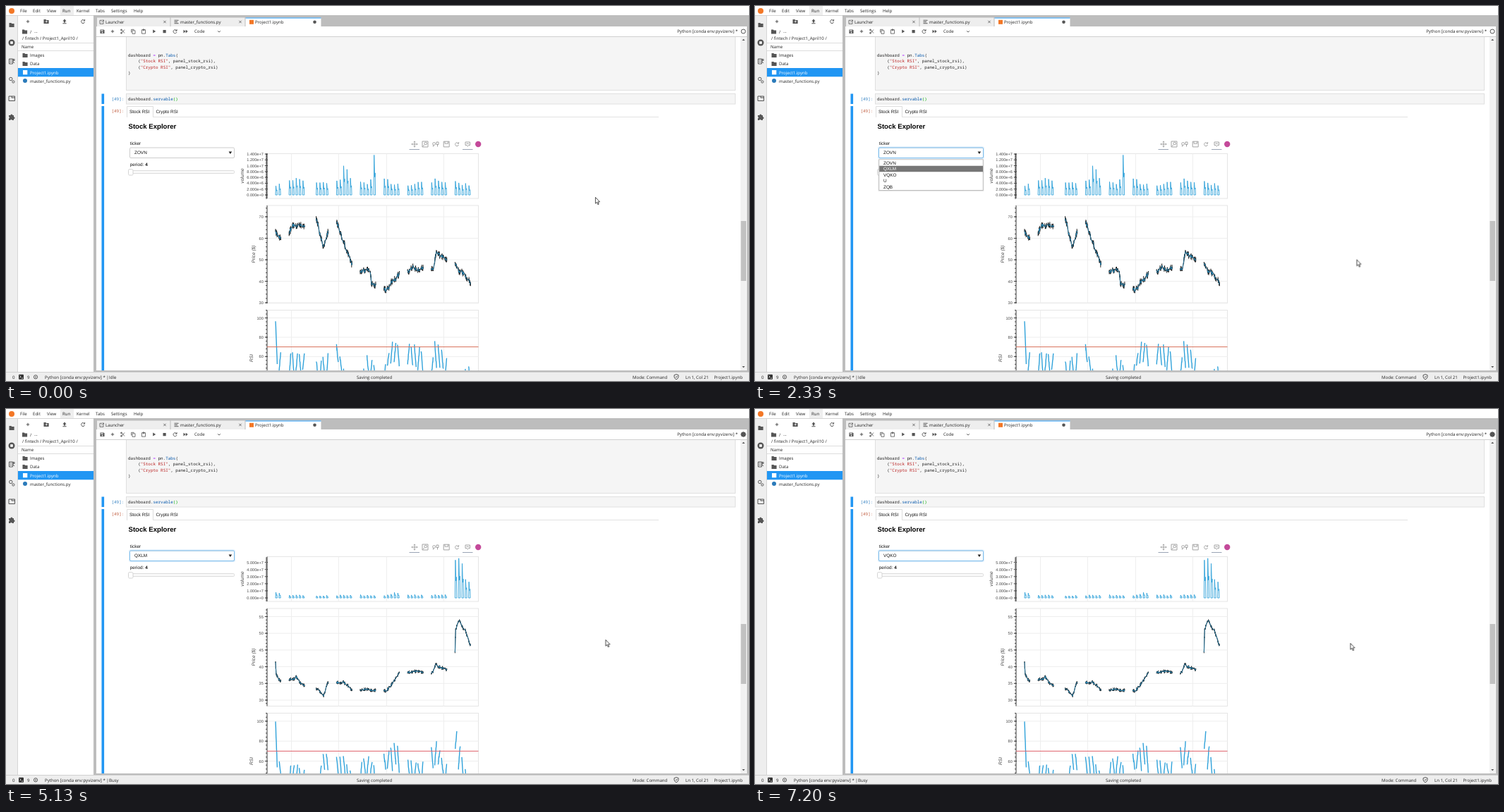
An HTML page that plays this animation: 1053x532 px, repeating every 8000 ms.

```html
<!DOCTYPE html>
<html lang="en">
<head>
<meta charset="utf-8">
<title>Notebook dashboard</title>
<style>
html, body { margin: 0; width: 100%; height: 100%; overflow: hidden; background: #fff; }
svg { display: block; width: 1053px; height: 532px; }
text { font: 6.1px "Open Sans", sans-serif; fill: #222; white-space: pre; text-rendering: geometricPrecision; }
.p { font: 6.4px "Liberation Sans", Arial, sans-serif; fill: #111; }
.h { font: bold 9.6px "Liberation Sans", Arial, sans-serif; fill: #000; }
.a { font: 5.6px "Liberation Sans", Arial, sans-serif; fill: #444; text-anchor: end; }
.n { font: italic 6.6px "Liberation Sans", Arial, sans-serif; fill: #444; text-anchor: middle; }
.m { font: 5.92px "Noto Sans Mono", monospace; fill: #222; }
.w { fill: #fff; }
.e { text-anchor: end; }
.i { fill: none; stroke: #555; stroke-width: 1; }
.f { fill: #555; }
.g { fill: none; stroke: #a3a3a3; stroke-width: 1; }
.thin { fill: none; stroke: #555; stroke-width: .8; }

.anim { animation: 8s step-end infinite; opacity: 0; }
#menu { animation-name: menu; }
#row { animation: row 8s step-end infinite; }
#ring { animation-name: ring; }
#busy { animation-name: busy; }
#idle { animation-name: idle; }
#chartA { animation-name: before; }
#chartB { animation-name: after; }
#pick0 { animation-name: pick0; }
#pick1 { animation-name: pick1; }
#pick2 { animation-name: pick2; }
#cursor { animation: move 8s step-end infinite; }

@keyframes menu {
  0%, 34.95%, 80.8%, 100% { opacity: 0 }
  25.8%, 69.1% { opacity: 1 }
}
@keyframes row {
  0% { transform: translateY(0) }
  27.45% { transform: translateY(8.5px) }
  77.45%, 100% { transform: translateY(17px) }
}
@keyframes ring { 0% { opacity: 0 } 25.8%, 100% { opacity: 1 } }
@keyframes busy {
  0%, 64.95% { opacity: 0 }
  35.8%, 81.7%, 100% { opacity: 1 }
}
@keyframes idle {
  0%, 64.95% { opacity: 1 }
  35.8%, 81.7%, 100% { opacity: 0 }
}
@keyframes before { 0% { opacity: 1 } 64.1%, 100% { opacity: 0 } }
@keyframes after { 0% { opacity: 0 } 64.1%, 100% { opacity: 1 } }
@keyframes pick0 { 0% { opacity: 1 } 34.95%, 100% { opacity: 0 } }
@keyframes pick1 { 0%, 80.8%, 100% { opacity: 0 } 34.95% { opacity: 1 } }
@keyframes pick2 { 0% { opacity: 0 } 80.8%, 100% { opacity: 1 } }
@keyframes move {
  0% { transform: translate(835px, 271px) }
  1.6% { transform: translate(835px, 271px); animation-timing-function: steps(4, start) }
  4.95% { transform: translate(835px, 302px) }
  5.85% { transform: translate(835px, 299px) }
  14.95% { transform: translate(835px, 299px); animation-timing-function: steps(4, start) }
  18.3% { transform: translate(854px, 311px) }
  20.8% { transform: translate(854px, 311px); animation-timing-function: steps(3, start) }
  23.3% { transform: translate(854px, 331.5px) }
  25.8% { transform: translate(854px, 331.5px); animation-timing-function: steps(5, start) }
  29.95% { transform: translate(852.5px, 359.5px) }
  30.8% { transform: translate(852.5px, 361px) }
  34.95% { transform: translate(852.5px, 361px); animation-timing-function: steps(8, start) }
  41.6% { transform: translate(849.5px, 325.5px) }
  46.6% { transform: translate(849.5px, 327px) }
  69.1% { transform: translate(849.5px, 327px); animation-timing-function: steps(5, start) }
  73.3% { transform: translate(847.5px, 354.5px); animation-timing-function: steps(2, start) }
  74.95% { transform: translate(846px, 370px) }
  77.45% { transform: translate(845.5px, 373px) }
  78.3% { transform: translate(845px, 376px) }
  80.8% { transform: translate(845px, 376px); animation-timing-function: steps(6, start) }
  85.8% { transform: translate(843.5px, 333px) }
  89.95%, 100% { transform: translate(843.5px, 332px) }
}
</style>
</head>
<body>
<svg id="stage" viewBox="0 0 1053 532" xmlns="http://www.w3.org/2000/svg"></svg>
<script>
const BLUE = '#30a2da';
const text = (x, y, s, cls = '', more = '') => `<text x="${x}" y="${y}" class="${cls}" ${more}>${s}</text>`;
const rect = (x, y, w, h, fill, more = '') => `<rect x="${x}" y="${y}" width="${w}" height="${h}" fill="${fill}" ${more}/>`;
const path = (d, cls = 'i', more = '') => `<path d="${d}" class="${cls}" ${more}/>`;
const line = (d, color, width = 1) => `<path d="${d}" fill="none" stroke="${color}" stroke-width="${width}"/>`;
const disc = (x, y, r, fill) => `<circle cx="${x}" cy="${y}" r="${r}" fill="${fill}"/>`;
const ink = (color, s) => `<tspan fill="${color}">${s}</tspan>`;
const group = (id, s) => `<g id="${id}" class="anim">${s}</g>`;
const folder = (x, y) => path('M-3.5-3h2.8l1 1h3.3v5h-7.1z', 'f', `transform="translate(${x} ${y})"`);
const plus = (x, y) => path(`M${x - 2.2} ${y}h4.4M${x} ${y - 2.2}v4.4`);
const reload = (x, y, cls = 'i') => path(`M${x + 2.2} ${y - 1.3}a2.5 2.5 0 1 0 .3 2M${x + 2.6} ${y - 3}v2h-2`, cls);
const cross = (x, y) => path(`M${x - 1.7} ${y - 1.7}l3.4 3.4m0-3.4l-3.4 3.4`, 'thin');

function rng(seed) {
  return () => (seed = (seed * 16807) % 2147483647) / 2147483647;
}

// Height at x on the polyline through the given points.
function curve(points, x) {
  const i = points.findIndex(p => p[0] >= x);
  if (i < 1) return points.at(i)[1];
  const [[x0, y0], [x1, y1]] = [points[i - 1], points[i]];
  return y0 + (y1 - y0) * (x - x0) / (x1 - x0);
}

// Trading days: five per week, short first and third weeks.
const weeks = Array.from({ length: 9 }, (_, week) => {
  const skip = [3, 0, 1][week] || 0;
  return Array.from({ length: 5 - skip }, (_, d) => 367.6 + 33.6 * week + 4.8 * (d + skip));
});
const days = weeks.flat();

function menuBar() {
  const items = [[20, 'File'], [38, 'Edit'], [58, 'View'], [80, 'Run'], [100, 'Kernel'], [127, 'Tabs'], [149, 'Settings'], [181, 'Help']];
  return rect(0, 0, 1053, 13, '#fff') + rect(77, 0, 19, 13, '#eee') + disc(8, 7, 4, '#f37726')
    + items.map(([x, s]) => text(x, 9.2, s)).join('');
}

function sideBar() {
  let s = rect(0, 13, 16, 506, '#eee') + line('M0 13.5H124M16.5 13.5V519', '#d5d5d5');
  s += folder(8, 27);
  s += disc(8, 52, 4.5, '#555') + rect(6.2, 50.2, 3.6, 3.6, '#fff');
  s += path('M4.5 75h5v7h-5zM6 77h2M6 79.5h2M10 75.5h2v2h-2z M10 79l2 2');
  s += path('M9 103.5a2.2 2.2 0 1 1-4.4 0a2.2 2.2 0 1 1 4.4 0M12 107.5a1.6 1.6 0 1 1-3.2 0a1.6 1.6 0 1 1 3.2 0');
  s += path('M4 128h8.5v6.5H4zM8 128v2h4.5');
  s += path('M4 155h2.4a1.5 1.5 0 0 1 3 0H11v2.3a1.5 1.5 0 0 1 0 3V162H8.7a1.4 1.4 0 0 0-2.6 0H4v-2.4a1.4 1.4 0 0 0 0-2.6z', 'f');
  return s;
}

function fileList() {
  let s = rect(17, 14, 107, 505, '#fff');
  s += plus(31, 22) + folder(57, 22) + line('M57.3 20.6v3M55.8 22h3', '#fff', .8);
  s += path('M83 18.5l2.6 3h-1.5v2h-2.2v-2h-1.5zM80.4 24.2h5.2v1h-5.2z', 'f') + reload(109, 22);
  s += folder(26.5, 36.5) + text(34, 38.5, '/') + text(40, 37.5, '…');
  s += text(23, 47.5, '/ fintech / Project1_April10 /');
  s += line('M17 52.5H124M17 63.5H124', '#ddd') + text(22, 60.2, 'Name');
  s += rect(17, 88, 107, 12.3, '#2196f3');
  s += folder(27, 70) + folder(27, 82) + rect(24, 91, 6.3, 6.3, '#fff') + disc(27, 106, 3, '#2b7bba');
  ['Images', 'Data', 'Project1.ipynb', 'master_functions.py'].forEach((name, i) => {
    s += text(34, 72.2 + 12.15 * i, name, i === 2 ? 'w' : '');
  });
  return s;
}

function tabs() {
  let s = rect(124, 13, 929, 507, '#bdbdbd') + rect(128, 29, 922, 488, '#fff');
  s += rect(129, 16.5, 103.5, 12.5, '#eee') + rect(233.5, 16.5, 105, 12.5, '#eee');
  s += rect(339.5, 16.5, 107, 12.5, '#fff') + rect(339.5, 16.5, 107, 1, '#2196f3');
  s += path('M136 20.3h-3v5h5v-3M136.5 20h2v2M138.3 20.2l-3 3', 'thin') + text(141, 24.7, 'Launcher') + cross(225, 22.5);
  s += path('M238.5 20.3h6M238.5 22.5h4.5M238.5 24.7h6') + text(247, 24.7, 'master_functions.py') + cross(332, 22.5);
  s += rect(345, 19.8, 6, 6, '#f37726') + text(353, 24.7, 'Project1.ipynb') + disc(437.5, 22.7, 2.3, '#555');
  return s;
}

function toolbar() {
  let s = line('M128 43.5H1050', '#d0d0d0');
  s += path('M133.5 33.5h5l1 1v4.5h-6z', 'f') + rect(134.5, 34.3, 3, 1.2, '#fff') + disc(136.5, 37.5, .9, '#fff');
  s += plus(151, 36);
  s += path('M163 33l5 5.5M163 39l5-5.5M164.5 34a1 1 0 1 1-2 0a1 1 0 1 1 2 0M164.5 38.3a1 1 0 1 1-2 0a1 1 0 1 1 2 0', 'thin');
  s += path('M179 34.8h4v4.5h-4zM177.6 37.5v-4.2h4M192.5 33.7h5v5.5h-5zM194 33h2v1.5h-2z', 'thin');
  s += path('M208.2 33.6l4 2.5l-4 2.5zM222.5 34h4.2v4.2h-4.2z', 'f') + reload(239.5, 36.2);
  s += path('M251.5 33.8l3 2.3l-3 2.3zM254.7 33.8l3 2.3l-3 2.3z', 'f');
  s += text(267, 38.2, 'Code') + path('M300.3 35.3l1.8 1.8l1.8-1.8');
  s += text(1037, 38.3, 'Python [conda env:pyvizenv] *', 'e');
  s += '<circle cx="1045" cy="36" r="3" class="i"/>';
  return s + group('busy', disc(1045, 36, 3.5, '#555') + text(146, 528.5, 'Busy')) + group('idle', text(146, 528.5, 'Idle'));
}

function cells() {
  const edge = 'stroke="#e0e0e0"';
  const str = t => ink('#ba2121', `"${t}"`);
  let s = rect(170.5, 43.5, 863, 76, '#f5f5f5', edge) + rect(170.5, 124.5, 863, 14.5, '#f5f5f5', edge);
  s += rect(135.5, 124.5, 3.6, 14.5, '#2196f3') + rect(135.5, 142, 3.6, 375, '#2196f3');
  const code = [
    `dashboard ${ink('#a2f', '=')} pn.${ink('#05a', 'Tabs')}(`,
    `    (${str('Stock RSI')}, panel_stock_rsi),`,
    `    (${str('Crypto RSI')}, panel_crypto_rsi)`,
    ')'
  ];
  s += code.map((row, i) => text(173, 71.6 + 8.5 * i, row, 'm')).join('');
  s += text(173, 133.8, `dashboard.${ink('#05a', 'servable')}${ink('#0a0', '()')}`, 'm');
  s += text(149.5, 133.8, ink('#307fc1', '[49]:'), 'm') + text(149.5, 151, ink('#bf5b3d', '[49]:'), 'm');
  s += rect(1041, 44, 8.5, 473, '#f1f1f1') + rect(1041.5, 305, 7.5, 85, '#c1c1c1');
  return s + path('M1043.2 49l2-2.3l2 2.3zM1043.2 511l2 2.3l2-2.3z', 'f');
}

function panel() {
  let s = line('M171 157.5H925', '#e2e2e2') + line('M171.5 157V142.5H208.5V157', '#ddd') + line('M172 157.5H208', '#fff');
  s += text(175, 151.8, 'Stock RSI', 'p') + text(212.5, 151.8, 'Crypto RSI', 'p');
  s += text(173.5, 174, 'Stock Explorer', 'h') + text(175.8, 197.4, 'ticker', 'p');
  s += rect(175.5, 201, 148, 14.5, '#fff', 'stroke="#ccc" rx="1.5"');
  s += group('ring', rect(174.6, 200.1, 149.8, 16.3, 'none', 'stroke="#e0effb" rx="2.5" stroke-width="1.6"')
    + rect(175.5, 201, 148, 14.5, 'none', 'stroke="#7dbdec" rx="1.5"'));
  s += path('M315.6 206.6h4.6l-2.3 3.3z', 'f', 'style="fill:#222"');
  names.slice(0, 3).forEach((name, i) => { s += group('pick' + i, text(182, 210.3, name, 'p')); });
  s += text(175.8, 227.4, 'period: <tspan font-weight="bold">4</tspan>', 'p');
  s += rect(174, 233.5, 149.5, 4, '#fafafa', 'stroke="#d9d9d9" stroke-width=".9" rx="1"');
  s += rect(173.5, 231.7, 6.5, 8.3, '#fff', 'stroke="#d0d0d0" stroke-width=".9" rx="1.5"');
  return s + tools();
}

function tools() {
  let s = path('M579 192v8M575 196h8M577.8 193.2l1.2-1.4l1.2 1.4M577.8 198.8l1.2 1.4l1.2-1.4M576.2 194.8l-1.4 1.2l1.4 1.2M581.8 194.8l1.4 1.2l-1.4 1.2', 'g');
  s += path('M590 192h8v8h-8zM596.5 195a1.8 1.8 0 1 1-3.6 0a1.8 1.8 0 1 1 3.6 0M593.3 196.5l-3 3', 'g');
  s += path('M608.5 195.5a1.9 1.9 0 1 1-3.8 0a1.9 1.9 0 1 1 3.8 0M605.5 197v2.6M610 193h3v3.5h-3zM611.5 196.5v3', 'g');
  s += path('M620.2 192.2h8v7.7h-8zM622 192.2v3h4.5v-3', 'g') + reload(639, 196.2, 'g');
  s += path('M651 193h6.5v4.6h-2l-1.2 1.6l-1.2-1.6H651zM652.5 195.3h3.5', 'g');
  s += line('M571.5 203.5H586M647 203.5H661.5', '#9aa4b5');
  return s + disc(669.2, 196, 4.2, '#c44a9a');
}

function axis(top, bottom, y0, step, labels, ruled = true) {
  let grid = '', ticks = `M370 ${top}V${bottom}`, s = '';
  for (let y = y0 + 20 * step; y > top; y -= step / 5) if (y < bottom) ticks += `M368 ${y}h2`;
  labels.forEach((label, i) => {
    const y = y0 - i * step;
    grid += `M370 ${y}H669.5`;
    ticks += `M366.8 ${y}h4.2`;
    s += text(364.8, y + 2, label, 'a');
  });
  return (ruled ? line(grid, '#eee') : '') + line(ticks, '#333', .9) + s;
}

function frame(top, bottom) {
  return rect(370, top, 299.5, bottom - top, '#fff', 'stroke="#e5e5e5"')
    + line([404, 471, 539, 620].map(x => `M${x}.5 ${top}V${bottom}`).join(''), '#eee');
}

// One spike per day: busy open, quiet middle, small rise at the close.
function volume(keys, rand) {
  return line(days.map(x => {
    const h = curve(keys, x) * (.8 + .4 * rand());
    return `M${x} 268l.5 ${-h}l.9 ${h * .55}l.6 ${-h * .1}l.4 ${h * .55}z`;
  }).join(''), BLUE, .9);
}

// Seven hourly bars per day around the trend, with the close on top.
function price(keys, rough, rand) {
  let bars = '', close = '';
  for (const week of weeks) {
    const points = [];
    for (const x0 of week) {
      const shift = (rand() - .5) * rough;
      for (let x = x0; x < x0 + 2.8; x += .45) {
        const y = curve(keys, x) + shift + (rand() - .5) * rough;
        const reach = rough * (.2 + .35 * rand());
        bars += `M${x.toFixed(1)} ${(y - reach).toFixed(1)}v${(2 * reach).toFixed(1)}`;
        points.push(`${x.toFixed(1)} ${y.toFixed(1)}`);
      }
    }
    close += 'M' + points.join('L');
  }
  return line(close, '#111', 1.1) + line(bars, '#111', .9) + line(close, BLUE, .7);
}

// A jagged run per day that hangs from the key curve.
function strength(keys, rand) {
  return line(days.map((x, i) => {
    const top = curve(keys, x), length = i ? 18 + 18 * rand() : 62;
    const falling = !i || rand() < .6;
    const run = Array.from({ length: 8 }, (_, j) => {
      const t = falling ? j / 7 : 1 - j / 7;
      return `${(x + j * .35).toFixed(1)} ${(top + t * length + rand() * 5).toFixed(1)}`;
    });
    return 'M' + run.join('L');
  }).join(''), BLUE, 1.4);
}

function chart({ seed, volStep, volLabels, vol, scale, labels, trend, rough, rsi: [y60, step], peaks, limit }) {
  const rand = rng(seed);
  return frame(209.5, 273) + axis(209.5, 273, 268, volStep, volLabels, false) + volume(vol, rand)
    + frame(283, 421.5) + axis(283, 421.5, ...scale, labels) + price(trend, rough, rand)
    + frame(431.5, 540) + axis(431.5, 540, y60, step, [60, 80, 100]) + strength(peaks, rand)
    + line(`M370 ${y60 - step / 2}H669.5`, limit);
}

const range = (count, from, step) => Array.from({ length: count }, (_, i) => from + i * step);
const powers = (count, step) => range(count, 0, step).map(v => v.toExponential(3));

const first = {
  seed: 71, volStep: 8.29, volLabels: powers(8, 2e6), scale: [421, 30.5], labels: range(5, 30, 10),
  vol: [[382, 16], [416, 22], [473, 17], [478, 42], [490, 18], [516, 17], [521, 54], [535, 21], [569, 13], [608, 22], [656, 13]],
  trend: [[382, 318], [390, 332], [401, 324], [406, 313], [421, 313], [440, 306], [450, 341], [456, 319], [469, 309],
    [490, 369], [502, 375], [516, 375], [518, 398], [541, 403], [550, 388], [578, 372], [605, 373], [610, 346], [636, 368], [658, 393]],
  rough: 6, rsi: [497.3, 27.4], limit: '#d9705a',
  peaks: [[382, 443], [387, 490], [421, 490], [444, 502], [468, 478], [483, 528], [502, 525], [512, 494], [530, 520],
    [545, 476], [579, 480], [603, 498], [608, 472], [640, 525], [656, 508]]
};
const second = {
  seed: 137, volStep: 10.1, volLabels: powers(6, 1e7), scale: [413, 23.7], labels: range(6, 30, 5),
  vol: [[382, 10], [402, 3.5], [540, 4], [555, 8], [570, 4], [624, 4], [636, 50], [642, 54], [656, 19]],
  trend: [[382, 360], [383, 377], [389, 386], [411, 381], [423, 393], [440, 397], [450, 406], [456, 389], [478, 387],
    [490, 399], [540, 399], [557, 374], [604, 373], [609, 364], [624, 368], [636, 368], [637, 316], [642, 300], [650, 313], [658, 335]],
  rough: 3, rsi: [499.5, 28.3], limit: '#e0606a',
  peaks: [[382, 443], [387, 498], [411, 503], [440, 520], [449, 486], [478, 492], [488, 512], [512, 490], [521, 504],
    [550, 472], [569, 494], [588, 500], [608, 469], [621, 505], [636, 455], [645, 488], [656, 524]]
};

// Invented tickers.
const names = ['ZOVN', 'QXLM', 'VQKO', 'U', 'ZQB'];

function menu() {
  const rows = color => names.map((s, i) => text(182, 224.6 + 8.5 * i, s, 'p', `style="fill:${color}"`)).join('');
  return group('menu', rect(174.5, 217.5, 150, 45.5, '#000', 'opacity=".1" rx="1"')
    + rect(175.8, 217.8, 147.4, 43.6, '#fff', 'stroke="#b5b5b5" stroke-width=".8"') + rows('#111')
    + `<clipPath id="pickRow"><rect id="row" x="176.2" y="218.2" width="146.8" height="8.6"/></clipPath>
       <g clip-path="url(#pickRow)">${rect(176, 218, 147.2, 43.5, '#767676')}${rows('#fff')}</g>`);
}

function statusBar() {
  let s = rect(0, 519.5, 1053, 12.5, '#eee') + line('M0 519.5H1053', '#d0d0d0');
  s += text(9, 528.5, '0') + rect(18, 522.7, 7, 7, '#333', 'rx="1"') + line('M19.5 524.5l1.6 1.5l-1.6 1.5M22 528h2', '#fff', .8);
  s += text(30, 528.5, '9') + '<circle cx="42" cy="526.3" r="2.6" class="i"/>' + disc(42, 526.3, .9, '#555');
  s += text(55, 528.5, 'Python [conda env:pyvizenv] * |') + text(497, 528.5, 'Saving completed') + text(888, 528.5, 'Mode: Command');
  s += path('M950 522.6l3 1v2.6q-.4 2.4-3 3.6q-2.6-1.2-3-3.6v-2.6zM948.8 526l1 1l1.6-2');
  return s + text(963, 528.5, 'Ln 1, Col 21') + text(1044, 528.5, 'Project1.ipynb', 'e');
}

const titles = [[336.5, 241, 'volume'], [352.5, 352, 'Price ($)'], [350, 499.5, 'RSI']]
  .map(([x, y, s]) => text(0, 0, s, 'n', `transform="translate(${x} ${y}) rotate(-90)"`)).join('');

document.getElementById('stage').innerHTML =
  menuBar() + sideBar() + fileList() + tabs() + cells()
  + '<clipPath id="page"><rect x="128" y="44" width="913" height="473"/></clipPath><g clip-path="url(#page)">'
  + panel() + group('chartA', chart(first)) + group('chartB', chart(second)) + titles + '</g>'
  + statusBar() + toolbar() + menu()
  + '<path id="cursor" d="M.4.4V9.2L2.4 7.4L3.9 10.7L5.2 10.1L3.8 6.9H6.5Z" fill="#fff" stroke="#222" stroke-width=".8"/>';
</script>
</body>
</html>
```
